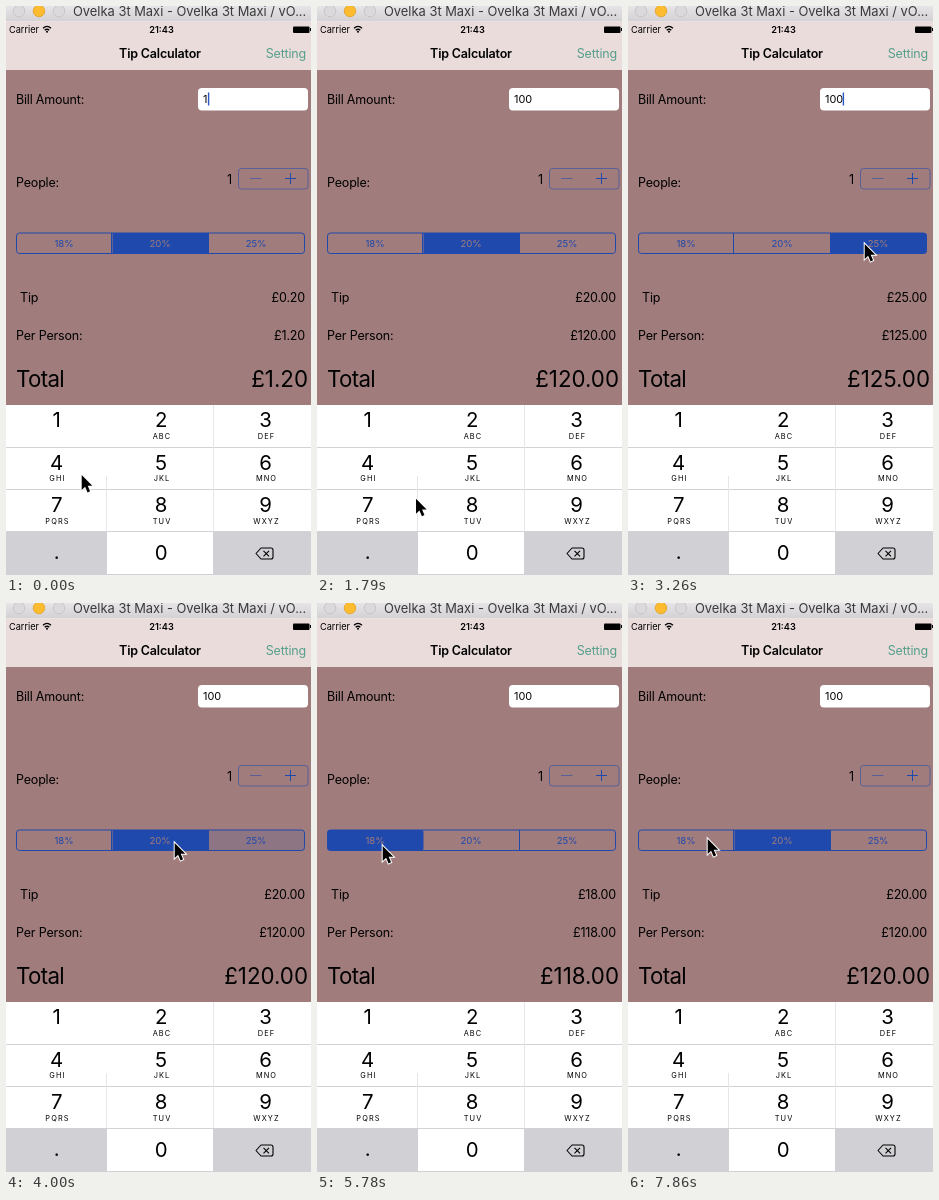
An HTML page for the animation above (8 s loop, 305 by 569 pixels).

```html
<!DOCTYPE html>
<html lang="en">
<head>
<meta charset="utf-8">
<title>Tip Calculator</title>
<style>
  html, body { margin: 0; width: 100%; height: 100%; overflow: hidden; }
  svg { display: block; width: 305px; height: 569px; }
  text { font: 12.5px Inter, "Open Sans", sans-serif; letter-spacing: -.015em; fill: #000; white-space: pre; }
  .mid { text-anchor: middle; }
  .end { text-anchor: end; }
  .bold { font-weight: 600; }
  .window { font-size: 12.9px; letter-spacing: 0; fill: #3b3a3b; }
  .status { font-size: 9.2px; letter-spacing: 0; }
  .field { font-size: 10.9px; letter-spacing: 0; }
  .big { font-size: 22.3px; letter-spacing: -.03em; }
  .big.end { letter-spacing: 0; }
  .seg { font-size: 9.6px; text-anchor: middle; }
  .digit { font-size: 20.4px; text-anchor: middle; }
  .abc { font-size: 7.4px; letter-spacing: 1.1px; text-anchor: middle; }
  .line { fill: none; stroke: #1f49ad; }
  .soft { stroke-opacity: .55; }
  .grid { fill: none; stroke: #d3d2d6; }
  .grid.pale { stroke: #e6e5e9; }
</style>
</head>
<body>
<svg viewBox="0 0 305 569">
  <defs>
    <linearGradient id="bar" x2="0" y2="1">
      <stop stop-color="#e6e4e6"/><stop offset="1" stop-color="#d3d1d3"/>
    </linearGradient>
  </defs>

  <!-- window bar -->
  <rect width="305" height="15.5" fill="url(#bar)"/>
  <g stroke-width=".8" fill="#dbd9db" stroke="#c2c0c2">
    <circle cx="13" cy="5" r="5.8"/>
    <circle cx="33" cy="5" r="5.8" fill="#fdbc2f" stroke="#e0a12a"/>
    <circle cx="53" cy="5" r="5.8"/>
  </g>
  <text class="window" x="67" y="10">Ovelka 3t Maxi - Ovelka 3t Maxi / vO...</text>

  <!-- status and navigation -->
  <rect y="15.5" width="305" height="49" fill="#ebdcdc"/>
  <text class="status" x="3" y="27">Carrier</text>
  <path d="M37 22.2Q41 18.6 45 22.2M38.7 24.2Q41 22.2 43.3 24.2" fill="none" stroke="#000" stroke-width="1.3"/>
  <circle cx="41" cy="25.8" r="1"/>
  <text class="status bold mid" x="155.5" y="27">21:43</text>
  <rect x="287" y="20.5" width="16.5" height="6.5" rx="1"/>
  <rect x="304" y="22" width="1" height="3"/>
  <text class="bold mid" x="154" y="52">Tip Calculator</text>
  <text class="end" x="300" y="52" style="fill:#559f8b">Setting</text>

  <!-- form -->
  <rect y="64" width="305" height="335" fill="#a17c7c"/>
  <text x="10" y="98">Bill Amount:</text>
  <rect x="192" y="82" width="110" height="22.5" rx="4" fill="#fff"/>
  <text class="field" x="197" y="97" id="bill"></text>
  <rect id="caret" y="86.5" width="1.4" height="13" fill="#2a56c6"/>

  <text x="10" y="181">People:</text>
  <text class="end" x="226" y="178">1</text>
  <rect class="line soft" x="232.5" y="162.5" width="69.5" height="20.5" rx="3"/>
  <path class="line soft" d="M244 172.5H255.5"/>
  <path class="line" d="M279 172.5H290M284.5 167V178"/>

  <g id="segs"></g>
  <rect class="line" x="10.5" y="227" width="288" height="20.5" rx="3"/>
  <path class="line" d="M105.5 227V247M202.5 227V247"/>

  <text x="14" y="296">Tip</text>
  <text class="end" x="299" y="296" id="tip"></text>
  <text x="10" y="334">Per Person:</text>
  <text class="end" x="299" y="334" id="each"></text>
  <text class="big" x="10" y="381">Total</text>
  <text class="big end" x="302" y="381" id="total"></text>

  <!-- keypad -->
  <rect y="399" width="305" height="170" fill="#fff"/>
  <rect y="525.5" width="305" height="43.5" fill="#d1d0d4"/>
  <rect id="zero" x="101" y="526" width="106" height="42" fill="#fff"/>
  <path class="grid" d="M0 441.5H305M0 483.5H305M0 525.5H305"/>
  <path class="grid pale" d="M207.500 399V525M100.500 470V525"/>
  <g id="keys"></g>
  <g fill="none" stroke="#000" stroke-width="1.1" stroke-linejoin="round">
    <path d="M250 547.5L255 542H265Q267 542 267 544V551Q267 553 265 553H255Z"/>
    <path d="M257.5 544.8L263 550.3M263 544.8L257.5 550.3"/>
  </g>

  <path id="mouse" d="M0 0V15L3.4 11.8L5.9 17.4L8.4 16.3L6 10.8H10.6Z" stroke="#fff" stroke-width="2" paint-order="stroke"/>
</svg>
<script>
const LOOP = 8000, STEPS = 54, STEP = LOOP / STEPS;
const BLUE = '#1f49ad', BACK = '#a17c7c', GREY = '#d1d0d4';
const RATES = [18, 20, 25];

const keyTaps = [3, 7];
const segTaps = [
  { at: 19, seg: 2 }, { at: 26, seg: 1 }, { at: 34, seg: 0 }, { at: 45, seg: 1 }
];
const home = { x: 75, y: 469 };
const moves = [
  { from: 0, to: 3, x: 122, y: 540 },
  { from: 10, to: 18, x: 236, y: 238, bow: -88 },
  { from: 22, to: 25, x: 168, y: 240 },
  { from: 28, to: 33, x: 65, y: 243 },
  { from: 39, to: 44, x: 183, y: 237 },
  { from: 46, to: 49, x: 248, y: 237 },
  { from: 49, to: 53, x: 79, y: 236 }
];

const $ = id => document.getElementById(id);

function add(parent, tag, attrs, label = '') {
  const el = document.createElementNS('http://www.w3.org/2000/svg', tag);
  for (const name in attrs) el.setAttribute(name, attrs[name]);
  el.textContent = label;
  return $(parent).appendChild(el);
}

const segs = RATES.map((rate, i) => {
  const width = 96, x = 10.5 + i * width;
  return {
    box: add('segs', 'rect', { x, y: 227, width, height: 20.5, rx: i === 1 ? 0 : 2, fill: BLUE }),
    label: add('segs', 'text', { class: 'seg', x: x + width / 2 - 0.5, y: 241 }, rate + '%')
  };
});

function addKey(label, abc, col, row) {
  const x = 50 + col * 104.5, y = 421 + row * 42.5;
  add('keys', 'text', { class: 'digit', x: x + 0.5, y }, label);
  add('keys', 'text', { class: 'abc', x: x + 1.5, y: y + 11.5 }, abc);
}
' ABC DEF GHI JKL MNO PQRS TUV WXYZ'.split(' ')
  .forEach((abc, i) => addKey(i + 1, abc, i % 3, Math.floor(i / 3)));
addKey('.', '', 0, 3.1);
addKey('0', '', 1, 3.13);

const money = n => '£' + n.toFixed(2);
const ease = f => f * f * (3 - 2 * f);

function pointer(k) {
  let { x, y } = home;
  for (const m of moves) {
    if (k <= m.from) break;
    const f = ease(Math.min(1, (k - m.from) / (m.to - m.from)));
    x += (m.x - x) * f + (m.bow || 0) * Math.sin(Math.PI * f);
    y += (m.y - y) * f;
  }
  return [x + 0.7, y];
}

// A segment is tinted while pressed; the one it replaces fades a step later.
function segments(k) {
  let pick = 1, tint = -1;
  for (const { at, seg } of segTaps) {
    if (k === at) tint = seg;
    if (k === at + 1) tint = pick;
    if (k > at) pick = seg;
  }
  return { pick, tint };
}

function draw(now) {
  const k = Math.floor((now % LOOP) / STEP + 0.04) % STEPS;
  const bill = 10 ** keyTaps.filter(at => k > at).length;
  const { pick, tint } = segments(k);
  const tip = bill * RATES[pick] / 100;

  $('bill').textContent = bill;
  $('tip').textContent = money(tip);
  $('each').textContent = $('total').textContent = money(bill + tip);

  segs.forEach(({ box, label }, i) => {
    box.setAttribute('opacity', i === pick ? 1 : i === tint ? 0.15 : 0);
    label.style.fill = i === pick ? BACK : BLUE;
  });

  const blink = k * STEP / 1000 % 1;
  const typing = k < 11;
  $('caret').setAttribute('opacity', typing || (blink >= 0.25 && blink < 0.77) ? 1 : 0);
  $('caret').setAttribute('x', 195.5 + 6.4 * String(bill).length);
  $('zero').setAttribute('fill', keyTaps.some(at => k === at || k === at + 1) ? GREY : '#fff');
  $('mouse').setAttribute('transform', `translate(${pointer(k)})`);
}

const start = performance.now();
function tick() {
  draw(performance.now() - start);
  requestAnimationFrame(tick);
}
tick();
</script>
</body>
</html>
```
